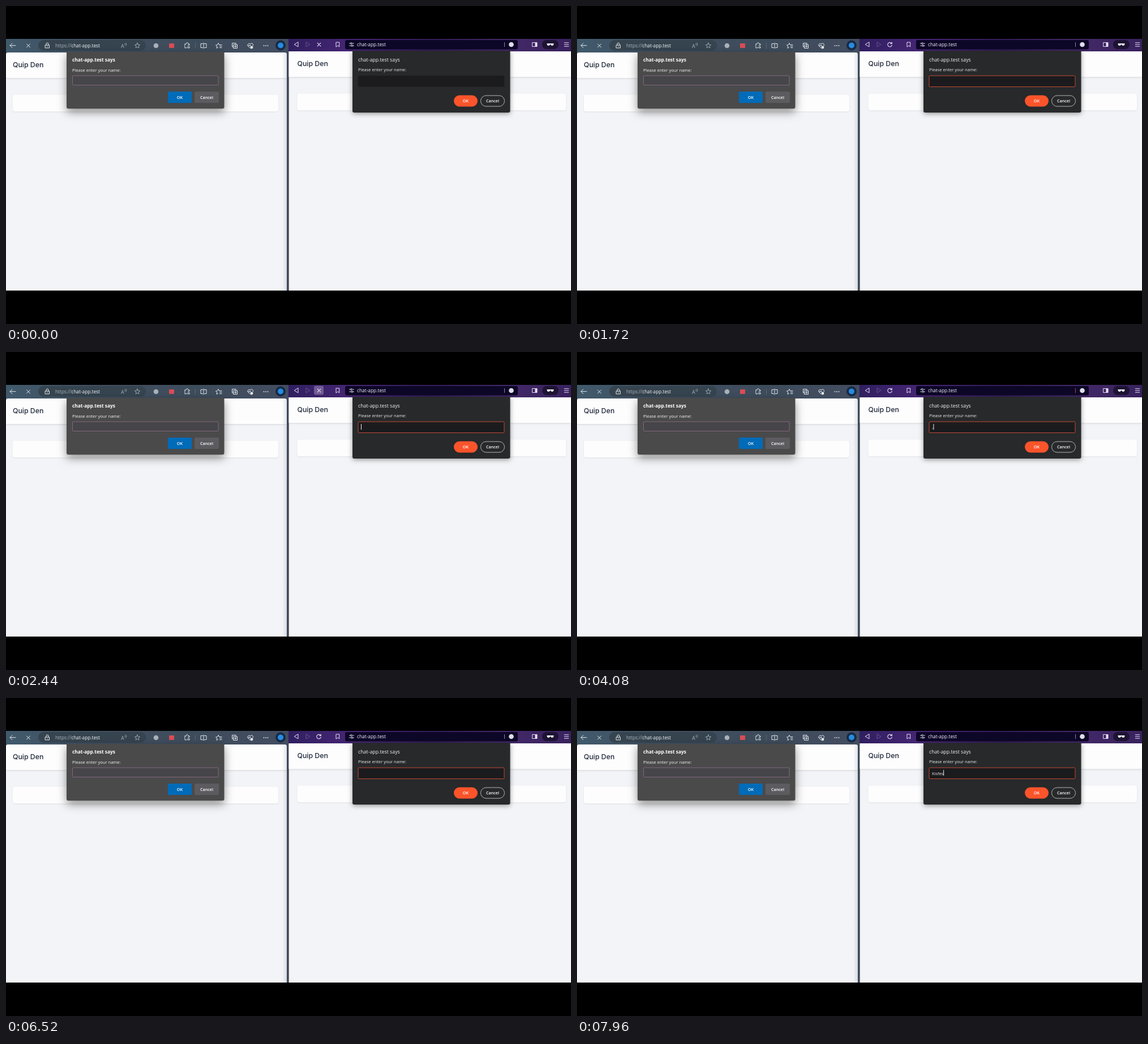
Recreate the animation shown at these times as an HTML page with a canvas. Size 998 by 561 pixels, loop 8 s.

```html
<!DOCTYPE html>
<html lang="en">
<head>
<meta charset="utf-8">
<title>Two browsers</title>
<style>
html, body { margin: 0; width: 100%; height: 100%; overflow: hidden; background: #000; }
canvas { display: block; }
</style>
</head>
<body>
<canvas id="stage" width="998" height="561"></canvas>
<script>
const ctx = document.getElementById('stage').getContext('2d');
const LOOP = 8000, BLINK = 520;
const SANS = '"Open Sans", "Noto Sans", sans-serif';
const INK = '#e4e8ec', PALE = '#e6e0f4';

const TITLE = 'Quip Den', HOST = 'chat-app.test';
const ARABIC = '،هسبثس', LATIN = 'Kisfes';

// Each edit: time and the resulting content of the right-hand input.
const typed = (word, times) => times.map((t, i) => [t, word.slice(0, i + 1)]);
const EDITS = [
  [80, ''], [2760, ''],
  ...typed(ARABIC, [4080, 4360, 4480, 4640, 4760, 4920]),
  ...[5640, 5720, 5780, 5840, 5900, 5960].map((t, i) => [t, ARABIC.slice(0, 5 - i)]),
  ...typed(LATIN, [7080, 7280, 7440, 7600, 7760, 7920])
];

function rect(x, y, w, h, fill, r = 0, border) {
  ctx.beginPath();
  ctx.roundRect(x, y, w, h, r);
  if (fill) { ctx.fillStyle = fill; ctx.fill(); }
  if (border) { ctx.strokeStyle = border; ctx.lineWidth = 1; ctx.stroke(); }
}

function shadowed(color, blur, dy, draw) {
  ctx.save();
  ctx.shadowColor = color;
  ctx.shadowBlur = blur;
  ctx.shadowOffsetY = dy;
  draw();
  ctx.restore();
}

function gradient(x0, x1, ...colors) {
  const g = ctx.createLinearGradient(x0, 0, x1, 0);
  colors.forEach((c, i) => g.addColorStop(i / (colors.length - 1), c));
  return g;
}

function text(s, x, y, size, color, { weight = 400, align = 'left', font = SANS, dir = 'ltr' } = {}) {
  ctx.font = `${weight} ${size}px ${font}`;
  ctx.textAlign = align;
  ctx.direction = dir;
  ctx.fillStyle = color;
  ctx.fillText(s, x, y);
  return ctx.measureText(s).width;
}

function disc(x, y, r, color) {
  ctx.beginPath();
  ctx.arc(x, y, r, 0, Math.PI * 2);
  ctx.fillStyle = color;
  ctx.fill();
}

// Strokes an SVG path placed around a centre point.
function icon(x, y, path, color = INK, width = 1, filled = false) {
  ctx.save();
  ctx.translate(x, y);
  ctx.strokeStyle = ctx.fillStyle = color;
  ctx.lineWidth = width;
  ctx.lineCap = ctx.lineJoin = 'round';
  const p = new Path2D(path);
  filled ? ctx.fill(p) : ctx.stroke(p);
  ctx.restore();
}

const CROSS = 'M-3 -3L3 3M3 -3L-3 3';
const STAR = 'M' + Array.from({ length: 10 }, (_, i) => {
  const r = i % 2 ? 2.2 : 5, a = i * Math.PI / 5;
  return `${(r * Math.sin(a)).toFixed(2)} ${(-r * Math.cos(a)).toFixed(2)}`;
}).join('L') + 'Z';

function page(x, y, w, cardX, cardW, radius) {
  rect(x, y, w, 502 - y, '#f3f4f7', [radius, radius, 0, 0]);
  shadowed('rgba(0,0,0,.13)', 3, 1, () => rect(x, y, w, 45, '#fdfdfe', [radius, radius, 0, 0]));
  text(TITLE, cardX, y + 26, 12.3, '#20293a', { weight: 500, font: 'Inter, sans-serif' });
  shadowed('rgba(0,0,0,.08)', 2, 1, () => rect(cardX, y + 74.5, cardW, 29.5, '#fdfdfe', 4));
}

function leftToolbar() {
  rect(0, 58, 499, 444, '#3f4a5c');
  rect(0, 58, 497, 25, gradient(0, 497, '#405a6b', '#424f62', '#3d4c5b', '#434d61'));
  rect(57, 60, 190, 19, '#35444f', 9.5);
  icon(12, 69.7, 'M5 0H-5M-1 -4L-5 0L-1 4');
  icon(39.5, 70, CROSS);
  icon(73, 70, 'M-3.5 -1H3.5V4H-3.5ZM-2 -1V-3A2 2 0 0 1 2 -3V-1M0 1.2V1.8');
  const w = text('https://', 87, 73, 8.3, '#aab5be');
  text(HOST, 87 + w, 73, 8.3, '#f5f7f8');
  text('A', 203, 73.5, 9, '#a8b3bc');
  icon(210, 68, 'M0 -2Q1.5 -1 0 1M2 -3Q4 -1 2 2', '#a8b3bc', .8);
  icon(232, 70, STAR, '#a3afb9', .9);
  disc(265, 70, 4.3, '#aab1b8');
  rect(288, 66, 9, 8, '#dc4c55', 1);
  icon(320, 70, 'M-4 -3H-1.5A1.7 1.7 0 1 1 1.5 -3H4V-.8A1.6 1.6 0 1 0 4 1.8V4H1.5A1.6 1.6 0 0 0 -1.5 4H-4V1.5A1.6 1.6 0 0 1 -4 -1Z');
  icon(334.5, 70, 'M0 -5V5', '#5d6b79', .8);
  icon(349, 70, 'M-1.5 -3.5H-5V3.5H-1.5M1.5 -3.5H5V3.5H1.5M0 -5V5');
  icon(375.5, 70, 'M-1 3L-3.5 4.5L-3 1L-5 -1L-2 -1.5L-.5 -4.5L1 -1.5H5.5M2 1H5.5M2 3.5H5.5');
  icon(404, 70, 'M-2 -2H4.5V4.5H-2ZM-2 2H-4.5V-4.5H2V-2M1.2 -.5V3M-.5 1.2H3');
  icon(431.5, 70, 'M0 4.5L-4.2 .3A2.7 2.7 0 0 1 0 -3A2.7 2.7 0 0 1 4.5 .3M-4.5 0H-1.5L-.5 -1.5L1 1.5H2');
  disc(434, 73, 2.4, INK);
  for (const x of [455.5, 459, 462.5]) disc(x, 70, .9, INK);
  disc(485, 69.5, 9, '#172b46');
  disc(485, 69.5, 5, '#278be0');
}

function rightToolbar(loading, hover, divider) {
  rect(499, 58, 499, 22, gradient(499, 998, '#301f60', '#482676', '#321d58', '#442968', '#38225e'));
  icon(513, 68, 'M3 -4V4L-3.5 0Z', PALE);
  icon(533, 68, 'M-3 -4V4L3.5 0Z', '#66558a');
  if (hover) rect(544, 59.5, 17, 16, '#715a94', 3);
  if (loading) icon(553, 68, 'M-2.8 -2.8L2.8 2.8M2.8 -2.8L-2.8 2.8', PALE, 1.2);
  else icon(552.5, 68, 'M3.2 -2A3.8 3.8 0 1 0 3.8 .8M3.8 -4V-1.5H1.2', PALE, 1.1);
  icon(586, 68, 'M-2.7 -4H2.7V4L0 1.8L-2.7 4Z', PALE);
  rect(599, 60, 305, 16.5, '#0d0727', 3);
  icon(610.5, 68, 'M-4 -2H-2M1.5 -2H4M-4 2H-1.5M2 2H4', PALE, .9);
  icon(610.5, 68, 'M-2 -2A1.4 1.4 0 1 0 .8 -2A1.4 1.4 0 1 0 -2 -2M-.8 2A1.4 1.4 0 1 0 2 2A1.4 1.4 0 1 0 -.8 2', PALE, .9);
  text(HOST, 620, 71, 8.35, '#f4f1fb');
  rect(880, 64, 1, 8, divider);
  disc(892.5, 68, 4.3, '#dfdde8');
  icon(934, 68, 'M-4 -3.5H4V3.5H-4Z', PALE);
  rect(934.5, 64.5, 3.5, 7, PALE);
  rect(947, 60, 29, 16, '#1d1333', 8);
  icon(961.5, 68, 'M-6 -2H6V-1L5.3 1.3Q3 3 1 1L.4 -.3H-.4L-1 1Q-3 3 -5.3 1.3L-6 -1Z', '#f4f2f8', 1, true);
  icon(990, 68, 'M-3.7 -3.3H3.7M-3.7 0H3.7M-3.7 3.3H3.7', PALE, 1.1);
}

function button(label, x, y, w, h, r, fill, border) {
  rect(x, y, w, h, fill, r, border);
  text(label, x + w / 2, y + h / 2 + 2.6, 7.2, '#fff', { weight: 600, align: 'center' });
}

function leftDialog() {
  shadowed('rgba(0,0,0,.45)', 16, 6, () => rect(107, 81, 278.5, 100, '#4a4a4b', [0, 0, 3, 3]));
  text(HOST + ' says', 117, 98, 8.4, '#fff', { weight: 700 });
  text('Please enter your name:', 117, 115.5, 7.55, '#f4f4f4');
  rect(117.5, 123, 257.5, 16.5, '#464549', 1, '#82687f');
  button('OK', 286, 151, 42, 20, 2, '#006bb8');
  button('Cancel', 333, 151, 43, 20, 2, '#5c5b5f');
}

function rightDialog(focused, content, caret) {
  shadowed('rgba(0,0,0,.4)', 8, 2, () => rect(612, 79, 278.5, 109, '#27292b', [0, 0, 3, 3]));
  text(HOST + ' says', 622, 97.5, 8.8, '#f1f1f1');
  text('Please enter your name:', 622, 115, 7.5, '#ececec');
  rect(622, 123, 258, 19.5, '#1b1b1d', 1.5, focused ? '#c54b38' : '#202123');
  if (focused) {
    const rtl = content.length > 1 && content[0] === ARABIC[0];
    const w = text(content, rtl ? 629.5 : 627, 135.5, 7.4, '#ededed', {
      dir: rtl ? 'rtl' : 'ltr',
      font: rtl ? '"DejaVu Sans", sans-serif' : SANS
    });
    if (caret) rect(rtl ? 627.5 : 627 + w, 127, 1, 10, '#f2f2f2');
  }
  button('OK', 791, 157.5, 42, 20, 10, '#fb542b');
  button('Cancel', 838.5, 158, 42, 19, 9.5, null, '#b5b5b5');
}

function draw(t) {
  const open = t < 1920 || t >= 2400;
  const focused = (t >= 80 && t < 1920) || t >= 2440;
  const loading = t < 360 || (t >= 2400 && t < 2800);
  const hover = t >= 2000 && t < 2560;
  const [since, content] = EDITS.filter(e => e[0] <= t).pop() || [0, ''];
  const caret = Math.floor((t - since) / BLINK) % 2 === 0;

  rect(0, 0, 998, 561, '#000');
  leftToolbar();
  page(0, 82, 496, 12, 469, 4);
  rect(488, 82, 8, 420, gradient(488, 496, 'rgba(90,100,120,0)', 'rgba(90,100,120,.18)'), [0, 4, 0, 0]);
  leftDialog();

  rightToolbar(loading, hover, t >= 2800 && t < 5120 ? '#a84a50' : '#8d82a5');
  page(499.5, 80, 498.5, 514.5, 474.5, 0);
  if (open) rightDialog(focused, content, caret);
  rect(0, 502, 998, 59, '#000');
}

function tick() {
  draw(performance.now() % LOOP);
  requestAnimationFrame(tick);
}
tick();
</script>
</body>
</html>
```
